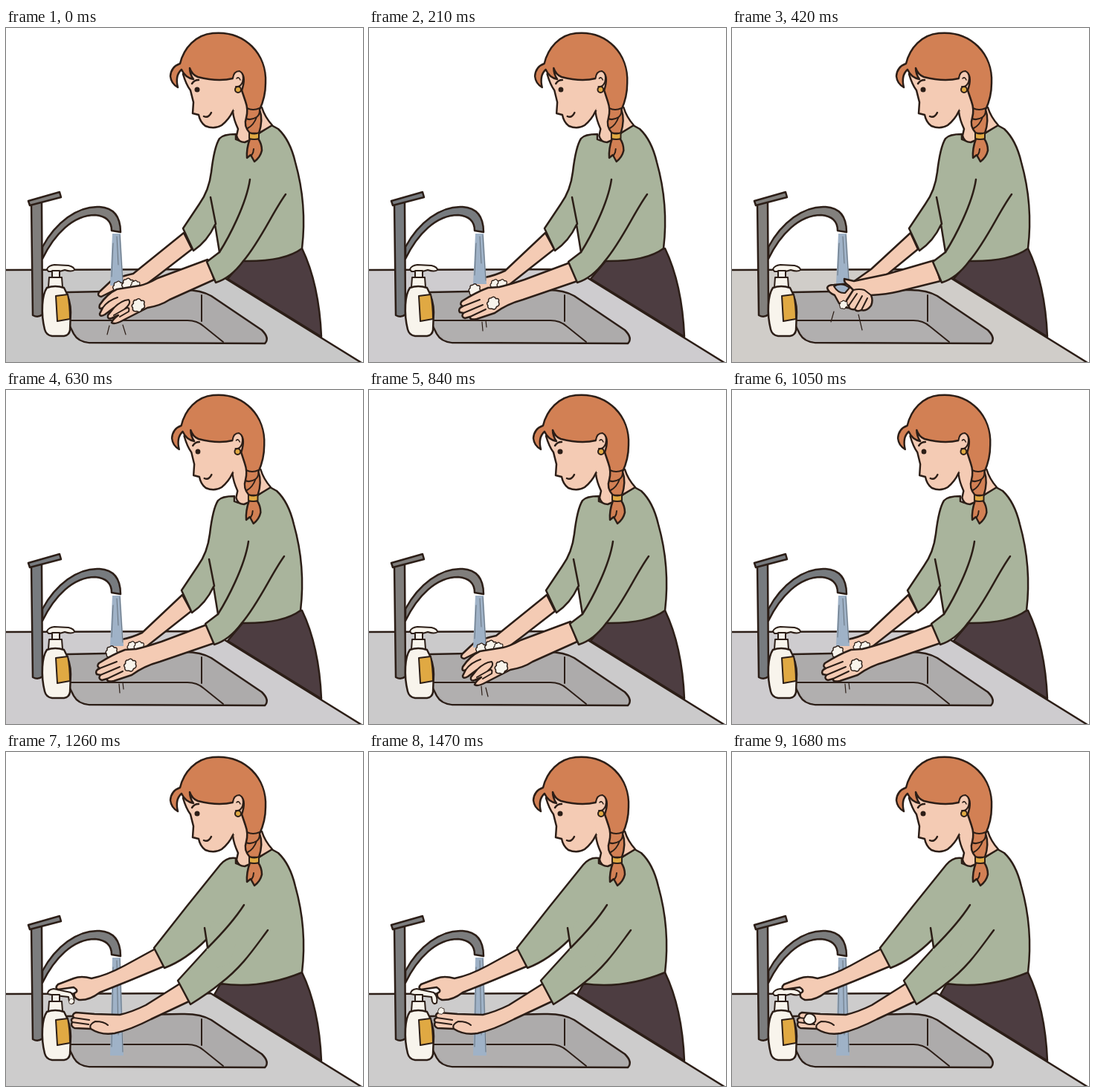
These frames come from a looping animation (480x450 px, 1.89 s). An HTML page with a canvas:

```html
<!DOCTYPE html>
<html lang="en">
<head>
<meta charset="utf-8">
<title>Washing hands</title>
<style>
html, body { margin: 0; width: 100%; height: 100%; overflow: hidden; background: #fff; }
canvas { display: block; }
</style>
</head>
<body>
<canvas id="stage" width="480" height="450"></canvas>
<script>
const ctx = document.getElementById('stage').getContext('2d');
const INK = '#2c1e17', SKIN = '#f4cbb4', HAIR = '#d28054', SHIRT = '#a9b49c';
const PANTS = '#4d3d41', CREAM = '#f8f4ec', GOLD = '#e0a943', WATER = '#9fb2c7';
const BOLD = 2.5, FINE = 2;
const STEP = 210;

function fill(d, color) {
  ctx.fillStyle = color;
  ctx.fill(new Path2D(d));
}
function line(d, width = BOLD, color = INK) {
  ctx.strokeStyle = color;
  ctx.lineWidth = width;
  ctx.stroke(new Path2D(d));
}
function shape(d, color, width = BOLD) {
  fill(d, color);
  line(d, width);
}
function dot(x, y, r, color, outlined) {
  ctx.beginPath();
  ctx.arc(x, y, r, 0, Math.PI * 2);
  ctx.fillStyle = color;
  ctx.fill();
  if (outlined) {
    ctx.strokeStyle = INK;
    ctx.lineWidth = FINE;
    ctx.stroke();
  }
}
function foam(x, y, s = 1) {
  ctx.save();
  ctx.translate(x, y);
  ctx.scale(s, s);
  shape('M-7-3Q-8-8-3-8Q1-12 4-7Q10-8 8-2Q11 3 5 5Q3 11-2 8Q-9 9-8 3Q-11 0-7-3Z', CREAM, 1.7);
  ctx.restore();
}

function head(narrow) {
  ctx.save();
  if (narrow) {
    ctx.translate(290, 0);
    ctx.scale(0.97, 1);
    ctx.translate(-290, 0);
  }
  // Neck and collar
  fill('M303 108L307 121L312 136L310 145Q313 154 322 154L357 131L343 108Z', SKIN);
  line('M305 113Q306 123 312 136L310 145Q312 154 321 154L328 151M344 107Q348 120 358 131L341 141');
  // Face
  shape('M238 62Q242 76 248 84L252 100L251 115L259 117Q261 127 268 132Q280 137 290 131Q300 123 305 112L323 88L317 55L250 45Z', SKIN);
  fill('M300 62H324V114L306 111Z', SKIN);
  // Hair and braid
  shape('M231 80Q222 75 221 65Q222 52 234 48C239 27 255 9 278 7C322 3 351 36 349 74Q349 93 341 110Q346 124 340 142L328 142Q319 132 323 121Q326 110 322 99L317 84Q323 66 316 60Q309 57 305 68Q285 73 258 66Q250 63 247 54Q247 62 252 69Q241 67 236 56Q227 64 231 80Z', HAIR);
  shape('M305 68Q306 58 314 58Q321 62 318 73Q315 80 309 79', SKIN, FINE);
  line('M310 68Q313 65 315 70', 1.5);
  dot(312, 83, 4, GOLD, true);
  line('M324 108Q332 112 341 108M323 122Q329 125 337 120Q341 117 341 111M325 135Q333 131 337 120', FINE);
  shape('M328 149Q323 163 324 175L329 171L334 180Q342 174 344 165Q344 156 339 149Z', HAIR);
  line('M333 163Q333 168 330 172', FINE);
  shape('M327 141Q335 144 340 141L340 149Q334 151 327 149Z', GOLD, FINE);
  // Eye, brow, smile
  dot(257, 83, 3.5, INK);
  line('M250 75Q253 70 259 70');
  line('M266 119Q272 122 276 114');
  ctx.restore();
}

function basin(counter, metal) {
  shape('M-4 326L275 325L478 451L-4 454Z', counter);
  shape('M82 356L235 353Q261 352 276 361L344 407Q355 418 348 425L112 424Q97 423 91 412L80 390Z', '#adabab');
  fill('M84 394H244Q257 394 266 402L292 423H112Q96 421 84 394Z', '#b1afaf');
  line('M84 394H244Q257 394 266 402L292 423M263 360V395', FINE);
  shape('M49 295C66 263 96 239 126 241Q154 243 154 275L142 273Q142 254 120 252C90 252 65 278 49 311Z', metal);
  shape('M34 235H48L49 386Q43 391 36 387Z', metal);
  shape('M30 233L72 221L74 228L32 239Z', metal);
}

function bottle(pressed) {
  if (pressed) {
    shape('M56 326Q56 320 64 319L87 324Q93 330 91 338Q87 341 85 336L84 330L66 328Z', CREAM, FINE);
  } else {
    shape('M55 325Q57 320 65 319L84 320Q92 322 92 326Q88 329 79 326L72 328L57 328Z', CREAM, FINE);
  }
  shape('M62 327H72V337H62Z', CREAM, FINE);
  shape('M58 336H75L76 349H57Z', CREAM, FINE);
  shape('M55 350Q66 346 78 350Q87 366 87 383L86 407Q85 414 78 415H62Q54 414 52 406Q48 390 49 373Q50 357 55 350Z', CREAM);
  shape('M67 361L83 359Q86 374 86 392L69 395Z', GOLD, FINE);
}

function water(bottom) {
  fill(`M143 277H154L158 ${bottom}H140Z`, WATER);
  line(`M149 281L151 ${bottom - 28}M153 279L157 ${bottom - 5}M144 290L142 ${bottom - 12}`, 1, '#68747f');
}

function torso(reaching) {
  const waist = reaching ? 'L280 327L288 313' : 'L298 338L319 313';
  shape(`M398 297Q421 345 424 416${waist}Z`, PANTS);
}

function shirtWashing() {
  shape('M309 143Q292 143 287 149Q280 160 276 194Q273 219 260 237L238 270L252 300Q271 287 281 265L287 302L270 315L282 343Q302 337 319 314Q374 315 398 297Q405 238 389 181Q382 151 366 136L357 131Q340 142 328 150Q319 155 309 150Z', SHIRT);
  line('M275 228L282 264M328 204C323 238 299 283 287 302M376 224C358 249 342 287 319 314');
}

function shirtReaching() {
  shape('M309 143Q297 141 288 152L243 208L199 264L213 291Q242 280 270 252Q276 271 271 264L231 308L248 340Q272 325 288 312Q342 320 398 297Q405 238 389 181Q382 151 366 136L357 131Q340 142 328 150Q319 155 309 150Z', SHIRT);
  fill('M269 250L270 267L284 291L300 286L315 240L278 228Z', SHIRT);
  line('M267 237L271 263M320 206Q304 231 271 264M352 240C334 264 318 289 288 312');
}

function splash(long) {
  line(long ? 'M139 401L136 413M157 400L161 413' : 'M151 399L152 411M157 401L160 413', 1.2);
}

// Near arm crosses over with interlaced fingers.
function handsLaced(longSplash) {
  splash(longSplash);
  shape('M239 276L171 331Q152 335 141 341L125 356Q122 361 128 362L144 354L151 361L181 351L205 333L250 298Z', SKIN);
  water(347);
  foam(151, 349, .8);
  foam(164, 346, .9);
  foam(174, 347, .7);
  shape('M271 312L204 337Q190 345 180 347L149 352Q136 358 126 373Q124 380 130 377L126 385Q126 390 133 386L145 377L137 387Q136 393 142 391L151 387Q143 393 142 397Q146 400 157 394L190 377Q208 374 220 366L280 339Z', SKIN);
  line('M130 377Q137 367 150 363M145 377Q155 367 165 366Q169 371 159 379L145 387M159 379Q167 374 165 382L153 389', FINE);
  foam(178, 374, .95);
}

// Fingers stretched flat over the back of the other hand.
function handsFlat() {
  line('M152 396L153 408M157 394L158 403', 1.2);
  shape('M237 276L183 327Q168 334 156 336L143 345L138 357L177 355L249 298Z', SKIN);
  water(345);
  foam(142, 353, .85);
  foam(170, 346, .75);
  foam(179, 346, .75);
  shape('M273 315L209 339Q188 346 175 349L160 350Q144 356 125 368Q121 372 126 375Q119 378 122 383L127 384Q123 389 129 391L136 389Q135 394 145 392L169 384Q185 372 207 366L280 341Z', SKIN);
  line('M126 375L149 366M127 384L153 373M136 389L157 379', FINE);
  foam(167, 371, .9);
}

function handsCupped() {
  line('M137 382L133 396M170 386L175 407', 1.2);
  shape('M240 276L187 325L163 342L164 358L205 335L250 298Z', SKIN);
  water(345);
  shape('M137 346Q129 346 128 350Q129 356 138 360L144 371Q150 378 160 377L179 363L160 344Z', SKIN);
  shape('M137 348Q148 342 158 350L152 357Q143 358 137 348Z', WATER, FINE);
  shape('M272 313L207 332L164 341L151 338Q150 343 157 347L163 353L154 367Q152 373 157 374Q157 380 165 379Q168 383 174 380Q181 382 187 374Q190 367 187 360Q208 359 224 355L280 341Z', SKIN);
  line('M163 353Q171 351 178 353L187 360M157 374L168 358M165 379L175 361M174 380L182 364', FINE);
  foam(150, 373, .6);
}

function handsAtPump(phase) {
  water(409);
  bottle(phase < 2);
  shape('M201 265L159 288Q135 301 115 305Q101 301 91 305L70 313Q65 318 70 320L91 317Q99 322 92 325Q90 331 98 334Q112 335 126 324L166 308L214 288Z', SKIN);
  shape('M234 312L188 341Q170 350 153 354L119 353L94 351Q88 353 91 358Q86 360 89 364Q86 369 92 372L114 373Q128 382 146 379Q168 374 195 360L246 336Z', SKIN);
  line('M91 358L112 361M89 364L111 367M114 373Q111 367 120 363Q132 363 137 368', FINE);
  if (phase === 0) foam(88, 336, .4);
  if (phase === 1) foam(97, 349, .5);
  if (phase === 2) shape('M98 357Q100 351 107 353Q114 356 112 363Q107 369 100 366Q94 362 98 357Z', CREAM, FINE);
}

const laced = longSplash => ({ paint: () => handsLaced(longSplash), metal: '#807e7c' });
const flat = { paint: handsFlat, lean: true, metal: '#777b7f', counter: '#cecccf' };
const cupped = { paint: handsCupped, metal: '#82807d', counter: '#d0cdc9' };
const pump = phase => ({ paint: () => handsAtPump(phase), reach: true, metal: '#7c7d7e', counter: '#cdcccc' });
const poses = [
  { ...laced(true), counter: '#c8c8c8' },
  flat,
  cupped,
  flat,
  { ...laced(false), counter: '#cbcacb' },
  flat,
  pump(0), pump(1), pump(2)
];

function scene(pose) {
  ctx.fillStyle = '#fff';
  ctx.fillRect(0, 0, 480, 450);
  ctx.lineCap = ctx.lineJoin = 'round';
  torso(pose.reach);
  basin(pose.counter, pose.metal);
  if (!pose.reach) bottle(false);
  pose.paint();
  ctx.save();
  if (pose.lean) ctx.translate(-2, 0);
  if (pose.reach) shirtReaching();
  else shirtWashing();
  ctx.restore();
  head(pose.lean);
}

let shown = -1;
function tick() {
  const index = Math.floor(performance.now() / STEP) % poses.length;
  if (index !== shown) scene(poses[shown = index]);
  requestAnimationFrame(tick);
}
tick();
</script>
</body>
</html>
```
